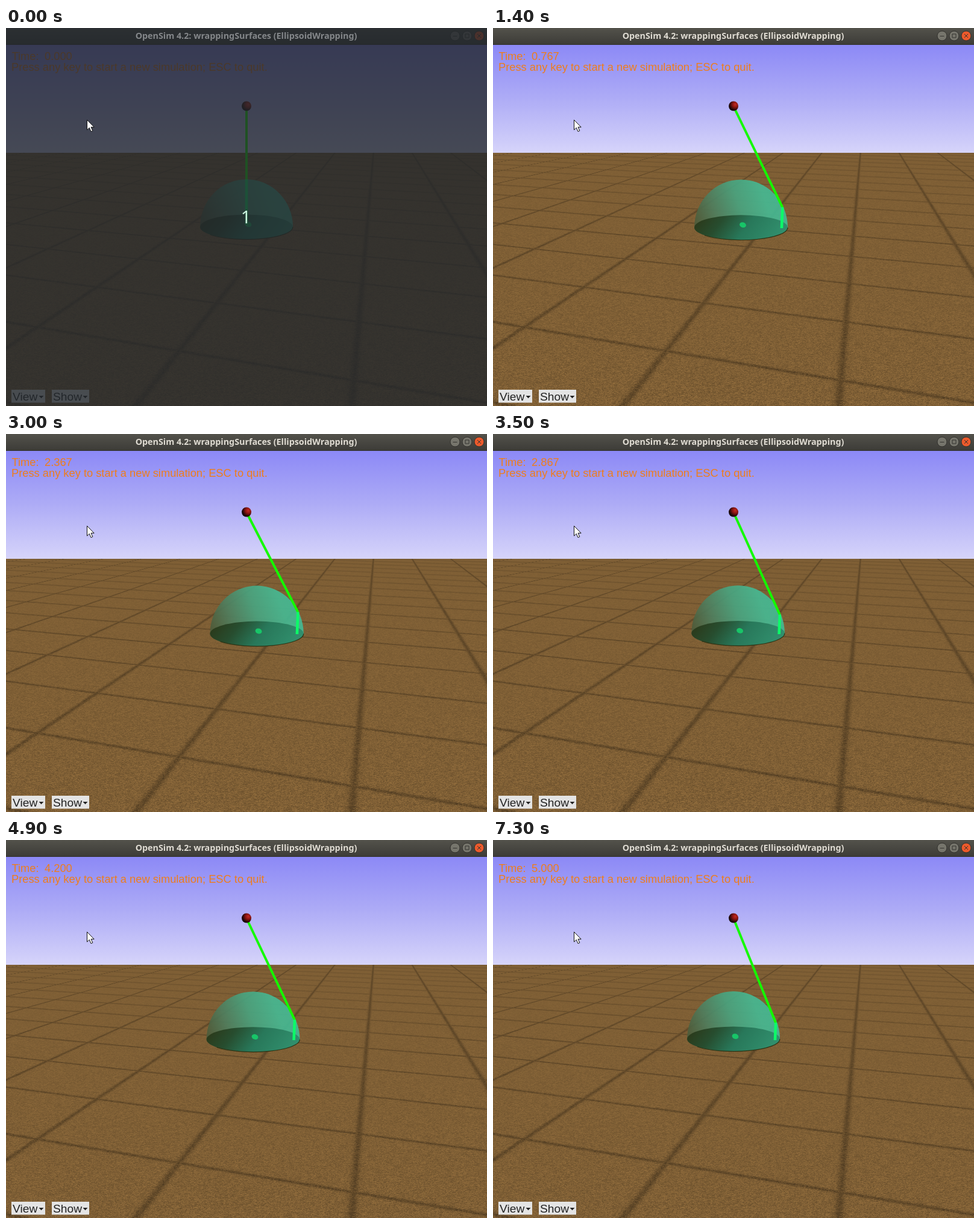
Write an HTML page with a canvas that moves like this. It is 798 px wide and 627 px high and loops after 7600 ms.

```html
<!DOCTYPE html>
<html lang="en">
<head>
<meta charset="utf-8">
<title>Ellipsoid wrapping</title>
<style>
  html, body { margin: 0; width: 100%; height: 100%; overflow: hidden; background: #222; }
  canvas, svg { position: absolute; left: 0; top: 0; width: 798px; height: 627px; display: block; }
  text { white-space: pre; }
  .title { font: bold 14.3px "Noto Sans", "Open Sans", sans-serif; text-anchor: middle; }
  .hud { font: 18.3px "Liberation Sans", Arial, sans-serif; fill: #ee7d1c; }
  .menu { font: 19.2px "Liberation Sans", Arial, sans-serif; fill: #222; }
  .count { font: 29px "Noto Sans", sans-serif; fill: #cdf5e0; text-anchor: middle; }
</style>
</head>
<body>
<canvas id="ground" width="798" height="627"></canvas>
<svg viewBox="0 0 798 627" xmlns="http://www.w3.org/2000/svg">
  <defs>
    <linearGradient id="bar" x2="0" y2="1">
      <stop offset="0" stop-color="#53524b"/><stop offset="1" stop-color="#3c3b37"/>
    </linearGradient>
    <linearGradient id="shell" x1="0" y1=".62" x2="1" y2=".38">
      <stop offset="0" stop-color="#4d5c3b"/><stop offset=".22" stop-color="#4f7d5d"/>
      <stop offset=".5" stop-color="#49a37f"/><stop offset=".78" stop-color="#46b892"/>
      <stop offset="1" stop-color="#43b994"/>
    </linearGradient>
    <linearGradient id="base" x1="0" y1=".4" x2="1" y2=".6">
      <stop offset="0" stop-color="#2b3a1b"/><stop offset=".25" stop-color="#274d2f"/>
      <stop offset=".55" stop-color="#28785a"/><stop offset="1" stop-color="#32916f"/>
    </linearGradient>
    <radialGradient id="red" cx=".68" cy=".34" r=".7">
      <stop offset="0" stop-color="#c42a22"/><stop offset=".4" stop-color="#8a1512"/>
      <stop offset=".8" stop-color="#260808"/><stop offset="1" stop-color="#120606"/>
    </radialGradient>
  </defs>

  <g id="dome">
    <path d="M-77 0A77 79 0 0 1 77 0A77 20.5 0 0 1 -77 0Z" fill="url(#shell)" opacity=".92"/>
    <ellipse rx="77" ry="20.5" fill="url(#base)"/>
    <path d="M-60 13A77 20.5 0 0 0 77 0" fill="none" stroke="#2d3415" stroke-width="1.2"/>
    <ellipse cx="1.5" cy="-5" rx="5.5" ry="4.3" fill="#18c568" transform="rotate(18)"/>
  </g>
  <g fill="none" stroke-linejoin="round">
    <path id="upper" stroke="#14fa00" stroke-width="4"/>
    <path id="lower" stroke="#0cfa68" stroke-width="4.6"/>
  </g>
  <circle cx="399" cy="129.5" r="8" fill="url(#red)"/>

  <g class="hud">
    <text x="9.5" y="53">Time:</text>
    <text id="clock" x="64" y="53">0.000</text>
    <text x="9" y="71">Press any key to start a new simulation; ESC to quit.</text>
  </g>

  <g fill="#e4e4e4">
    <rect x="9" y="600" width="56" height="21.5"/>
    <rect x="76" y="600" width="62" height="21.5"/>
  </g>
  <g class="menu">
    <text x="11" y="618">View</text>
    <text x="78" y="618">Show</text>
    <path d="M54.5 610h8l-4 4.2zM127.500 610h8l-4 4.200z"/>
  </g>

  <rect width="798" height="28" fill="url(#bar)"/>
  <rect y="27" width="798" height="1" fill="#302f2b"/>
  <g stroke="#33322e">
    <circle cx="745" cy="13" r="8" fill="#76756c"/>
    <circle cx="765" cy="13" r="8" fill="#76756c"/>
    <circle cx="785" cy="13" r="8" fill="#ec5a2c"/>
    <path d="M741.500 13.500h7M762 10h6v6h-6zM782 10l6 6m0-6l-6 6" fill="none"/>
  </g>

  <g id="shade">
    <rect width="798" height="627" fill="#22272c" opacity=".8"/>
    <text class="count" x="398" y="324">1</text>
  </g>
  <text id="title" class="title" x="398.500" y="18">OpenSim 4.2: wrappingSurfaces (EllipsoidWrapping)</text>
  <path d="M134.500 152.500v16.500l3.800-3.600 2.700 6.300 2.800-1.200-2.700-6.100h5z" fill="#fff" stroke="#111"/>
</svg>
<script>
const $ = id => document.getElementById(id);
const W = 798, H = 627, TOP = 28, EDGE = 207;
const LOOP = 7600;

// Floor perspective: vanishing points of both tile directions lie on one horizon.
const HORIZON = 115, VX = 617, WX = -2215;

function mulberry(a) {
  return () => {
    a = a + 0x6D2B79F5 | 0;
    let t = Math.imul(a ^ a >>> 15, 1 | a);
    t = t + Math.imul(t ^ t >>> 7, 61 | t) ^ t;
    return ((t ^ t >>> 14) >>> 0) / 4294967296;
  };
}

// Darkness of a tile joint; `px` is the pixel size in tile units.
function joint(c, px) {
  const d = Math.abs(c - Math.round(c));
  const w = Math.max(0.022, px * 0.9);
  return Math.exp(-(d * d) / (w * w)) * Math.min(1, 0.022 / w + 0.25);
}

function paintGround() {
  const ctx = $("ground").getContext("2d");
  const sky = ctx.createLinearGradient(0, TOP, 0, EDGE);
  sky.addColorStop(0, "#8c89f6");
  sky.addColorStop(0.5, "#aeacf6");
  sky.addColorStop(1, "#d6d4fa");
  ctx.fillStyle = sky;
  ctx.fillRect(0, 0, W, EDGE);

  const img = ctx.createImageData(W, H - EDGE);
  const rnd = mulberry(7);
  let i = 0;
  for (let y = EDGE; y < H; y++) {
    const depth = y - HORIZON;
    const near = (y - EDGE) / (H - EDGE);
    let grain = 0;
    for (let x = 0; x < W; x++) {
      const u = ((x - VX) / depth + 0.086) / 0.7;
      const v = (x - WX) / (2805 * depth * 0.00056) + 0.21;
      const dark = Math.max(joint(u, 1 / (depth * 0.7)), joint(v, v / depth));
      grain = grain * 0.35 + (rnd() - 0.5);
      const l = 1 - 0.25 * dark + grain * (0.02 + 0.25 * near);
      img.data[i++] = 127 * l;
      img.data[i++] = 95 * l;
      img.data[i++] = 53 * l;
      img.data[i++] = 255;
    }
  }
  ctx.putImageData(img, 0, EDGE);
}

function simTime(ms) {
  if (ms < 800) return 0;
  const step = Math.floor(ms / 100) * 100;
  return Math.min(5, (step - (step < 4500 ? 633.33 : 700)) / 1000);
}

function draw(ms) {
  const t = simTime(ms);
  const swing = Math.sin(Math.PI * t);
  const dx = 18.7 * swing;
  const wraps = t > 0 && swing > -0.01;

  $("dome").setAttribute("transform",
    `translate(${399 + dx} ${330 + 0.075 * dx}) scale(${1 + 0.0005 * dx})`);

  if (wraps) {
    const kx = 469 + 0.9 * dx, ky = 303 - 0.45 * dx;
    $("upper").setAttribute("d", `M399 130L${kx} ${ky}`);
    $("lower").setAttribute("d", `M${kx} ${ky}L${468 + 0.87 * dx} 332`);
  } else {
    const entry = 330 - 79 * Math.sqrt(1 - (dx / 77) ** 2);
    $("upper").setAttribute("d", `M399 130V${entry}`);
    $("lower").setAttribute("d", `M399 ${entry}V326`);
  }

  const dim = ms < 300;
  $("clock").textContent = t.toFixed(3);
  $("shade").style.display = dim ? "" : "none";
  $("title").style.fill = dim ? "#84878a" : "#dfdbd2";
}

paintGround();
const start = performance.now();
function tick() {
  draw((performance.now() - start) % LOOP);
  requestAnimationFrame(tick);
}
tick();
</script>
</body>
</html>
```
